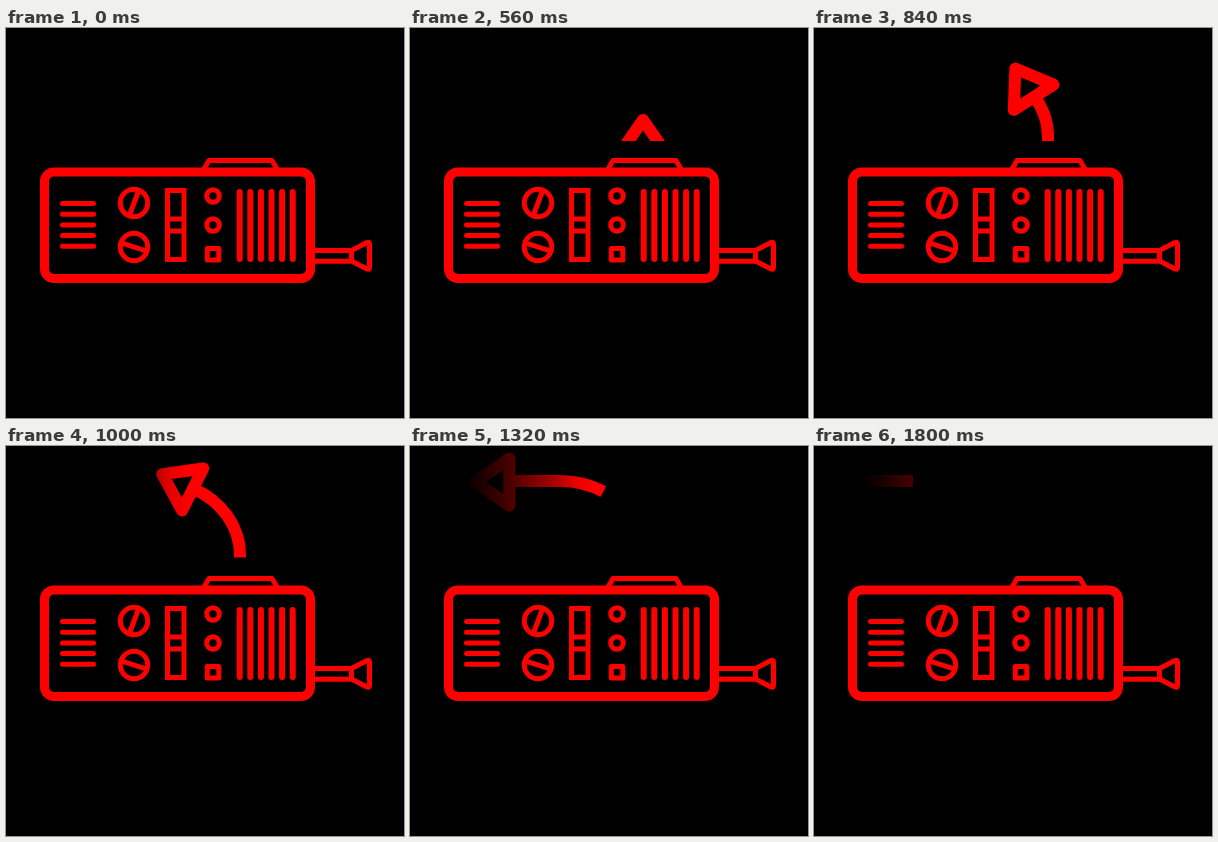
An HTML page for the animation above (1840 ms loop, 398 by 390 pixels).

```html
<!DOCTYPE html>
<html>
<head>
<meta charset="utf-8">
<style>
  html, body { margin: 0; width: 100%; height: 100%; overflow: hidden; background: #000; }
  svg { display: block; width: 398px; height: 390px; }
</style>
</head>
<body>
<svg viewBox="0 0 398 390" fill="none" stroke="#f00" stroke-width="5" stroke-linejoin="round">
  <defs>
    <clipPath id="above"><rect width="398" height="113"/></clipPath>
    <linearGradient id="fade" gradientUnits="userSpaceOnUse" x1="45" x2="185" y1="0" y2="0">
      <stop offset="0" stop-opacity="1"/>
      <stop offset=".164" stop-opacity=".91"/>
      <stop offset=".379" stop-opacity=".725"/>
      <stop offset=".7" stop-opacity=".35"/>
      <stop offset=".857" stop-opacity=".1"/>
      <stop offset="1" stop-opacity="0"/>
    </linearGradient>
  </defs>

  <g clip-path="url(#above)" stroke-width="12">
    <path id="stem" d="M234 173V109A84 74 0 0 0 150 35H-200"/>
    <path id="head" d="M0-24.5V22.5L34-1Z"/>
    <rect width="190" height="113" fill="url(#fade)" stroke="none"/>
  </g>

  <rect x="38.5" y="144" width="266" height="106.5" rx="9.5" stroke-width="9"/>
  <path d="M198 141L203 132.5H266L271 141"/>
  <path d="M56.5 175.5h31m-31 10.7h31m-31 10.7h31m-31 10.7h31m-31 10.7h31" stroke-linecap="round"/>
  <circle cx="128" cy="175" r="13.7"/>
  <circle cx="128" cy="219" r="13.7"/>
  <path d="M132.500 163L123.500 187M116 215.200L140 222.800"/>
  <path d="M161.500 162.500h16.500v69h-16.500zM161.500 191h16.500m-16.500 12h16.500" stroke-linejoin="miter"/>
  <circle cx="207" cy="168" r="6.300"/>
  <circle cx="207" cy="197" r="6.300"/>
  <rect x="201.300" y="220.500" width="11.500" height="11.500"/>
  <path d="M233.700 164v67m10.600-67v67m10.600-67v67m10.600-67v67m10.600-67v67m10.600-67v67" stroke-width="6" stroke-linecap="round"/>
  <path d="M308 222.500H345M308 233.200H345M345.500 222.500L361 214.500Q363.500 213.500 363.500 216V239.500Q363.500 242 361 241L345.500 233Z"/>
</svg>
<script>
  const LOOP = 1840, LEAD = 60; // LEAD: hidden path length below the clip edge
  const stem = document.getElementById('stem');
  const head = document.getElementById('head');
  const length = stem.getTotalLength();

  // Sinusoidal ease in and out, half a wave lasting 1800 ms
  const travel = (t, start, middle, reach) =>
    middle - reach * Math.cos(Math.max(0, t - start) * Math.PI / 1800);

  function draw(now) {
    const t = now % LOOP;
    const front = LEAD + travel(t, 200, 118, 162);
    const back = Math.max(0, LEAD + travel(t, 290, 49.5, 148));
    const p = stem.getPointAtLength(front);
    const q = stem.getPointAtLength(front - 10);
    const angle = Math.atan2(p.y - q.y, p.x - q.x) * 180 / Math.PI;

    stem.setAttribute('stroke-dasharray', `0 ${back} ${Math.max(0, front - back)} ${length}`);
    head.setAttribute('transform', `translate(${p.x} ${p.y}) rotate(${angle})`);
    requestAnimationFrame(draw);
  }

  const begin = performance.now();
  const tick = () => draw(performance.now() - begin);
  function frame() { tick(); }
  draw = (paint => now => paint(Math.max(0, now - begin)))(draw);
  frame();
</script>
</body>
</html>
```
